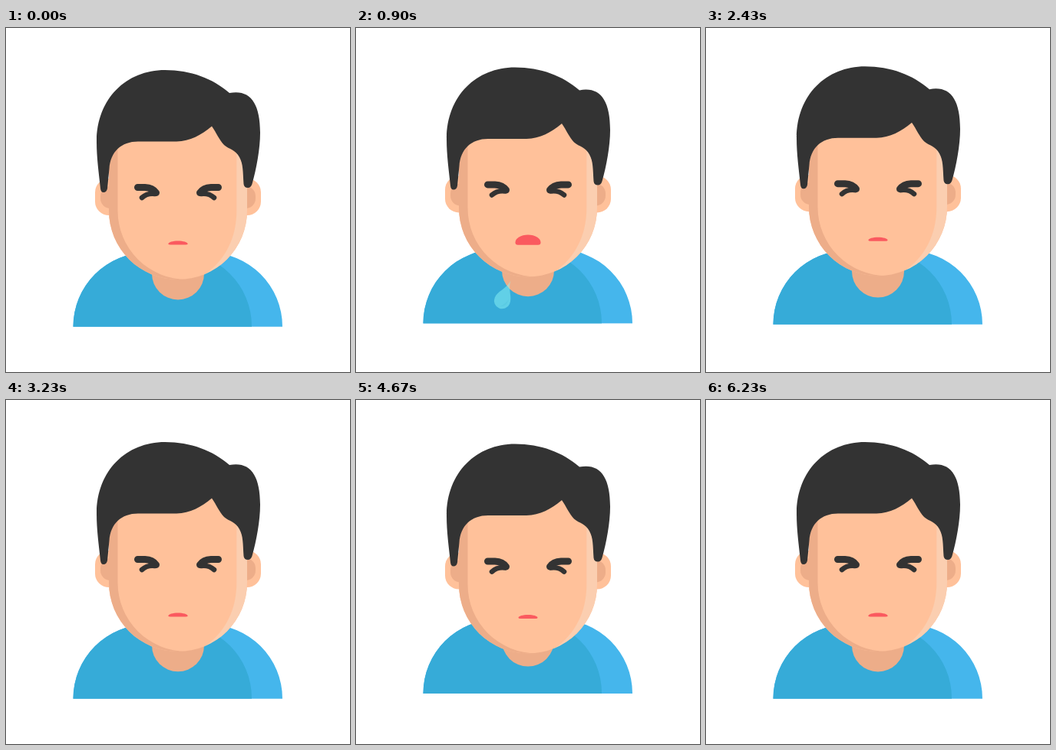
Recreate the animation shown at these times as an HTML page. Size 448 by 450 pixels, loop 6.26 s.

```html
<!DOCTYPE html>
<html lang="en">
<head>
<meta charset="utf-8">
<title>Coughing man</title>
<style>
  html, body { margin: 0; width: 100%; height: 100%; overflow: hidden; background: #fff; }
  svg { display: block; width: 448px; height: 450px; }
  .skin { fill: #ffc19a; }
  .shade { fill: #edad89; }
  .light { fill: #fbceb0; }
  .eye path { fill: none; stroke: #333; stroke-linecap: round; stroke-linejoin: round; }
  .streak { stroke: #f7f2f2; stroke-width: 8; stroke-linecap: round; }
</style>
</head>
<body>
<svg viewBox="0 0 448 450">
  <defs>
    <clipPath id="faceClip"><path d="M134 120H314V239A90 90 0 0 1 134 239Z"/></clipPath>
    <clipPath id="bodyClip"><path d="M87.500 390.700A97 97 0 0 1 184.500 293.700H263A97 97 0 0 1 360 390.700Z"/></clipPath>
    <clipPath id="mouthClip"><path class="mouth"/></clipPath>
    <g id="ear">
      <rect class="skin" x="116" y="197" width="36" height="48" rx="18"/>
      <rect class="shade" x="123" y="207" width="28" height="29" rx="13"/>
    </g>
    <g id="eye" class="eye">
      <path stroke-width="9" d="M171.500 208.500H181Q191 209 195.500 215.500"/>
      <path stroke-width="6.500" d="M194 217Q184 215.500 177 222"/>
    </g>
    <g id="drop">
      <path fill="#93faf9" d="M0-28C1-16 10.500-10 10.500 0A10.500 10.500 0 0 1-10.500 0C-10.500-10-1-16 0-28Z"/>
      <path fill="#84eff1" d="M7-5Q9 5 0 8Q5 3 7-5Z"/>
    </g>
  </defs>

  <g id="body">
    <g clip-path="url(#bodyClip)">
      <rect x="87" y="293" width="274" height="99" fill="#45b6ec"/>
      <path fill="#36abd8" d="M87 392V293H223A97 97 0 0 1 320 390V392Z"/>
    </g>
    <path class="shade" d="M190 290H258V321.400A34 34 0 0 1 190 321.400Z"/>
  </g>

  <g id="head">
    <use href="#ear"/>
    <use href="#ear" transform="matrix(-1 0 0 1 448 0)"/>
    <g clip-path="url(#faceClip)">
      <rect class="skin" x="134" y="120" width="180" height="210"/>
      <path class="shade" d="M134 120H145.500V239A90 90 0 0 0 235.500 329V331H134Z"/>
      <path class="light" d="M314 120H300.300V239C300.300 274 286 304 258 323V331H314Z"/>
    </g>
    <path fill="#333" d="M127 215Q123.500 215 123 210C121 190 118 170 118 149C118 92 157 55 207 55
      C241 55 269 66 291 85C318 80 331 98 331 137C331 158 326 185 320.500 204Q319 209 315 209Q310 209 309.500 204
      C308.500 188 309 178 304 169C299 159 291 159 284 153C278 147 274 137 268 128.500
      C254 140 240 148 222 148.500H172C150 148.500 136 162 134.500 184L132 210Q131 215 127 215Z"/>
    <use href="#eye"/>
    <use href="#eye" transform="matrix(-1 0 0 1 448 0)"/>
    <path class="mouth" fill="#fa5a5f"/>
    <g clip-path="url(#mouthClip)"><ellipse id="teeth" cx="224" fill="#fff"/></g>
  </g>

  <g id="spray"></g>
</svg>

<script>
const LOOP = 3130, TICKS = 94, COUGH_GAP = 33;
const $ = id => document.getElementById(id);
const clamp = x => Math.min(1, Math.max(0, x));
const ramp = (x, a, b) => clamp((x - a) / (b - a));
const smooth = u => u * u * (3 - 2 * u);

// [tick, vertical offset]
const nod = [[0, 0], [8, 0], [18, 3], [21, 3], [31, -7], [38, -7], [46, 2.5],
             [50, 3], [55, 3], [64, -6], [68, -6], [86, 0], [94, 0]];

// Place at the height of the cough (tick 22), speed per tick, tilt, tick when gone
const drops = [
  { x: 177, y: 327, vx: -5, vy: 3.6, tilt: 47, end: 25 },
  { x: 200.5, y: 332, vx: -2, vy: 4.9, tilt: 23, end: 28 },
  { x: 224, y: 338.5, vx: 0, vy: 5, tilt: -3, end: 25.5 },
  { x: 247.5, y: 336, vx: 2.3, vy: 6.2, tilt: -21, end: 27 },
  { x: 276, y: 327.5, vx: 5, vy: 3.6, tilt: -45, end: 25 }
];
const streaks = [[209.5, 298, 206, 312], [224, 295, 224, 310], [238, 298, 241.5, 312]];

function add(tag, attrs) {
  const el = document.createElementNS("http://www.w3.org/2000/svg", tag);
  for (const k in attrs) el.setAttribute(k, attrs[k]);
  return $("spray").appendChild(el);
}
const dropEls = drops.map(() => add("use", { href: "#drop" }));
const streakEls = streaks.map(([x1, y1]) => add("line", { class: "streak", x1, y1 }));
const mouths = document.querySelectorAll(".mouth");

function track(keys, x) {
  const i = Math.max(1, keys.findIndex(k => k[0] >= x));
  const [a, from] = keys[i - 1], [b, to] = keys[i];
  return from + (to - from) * smooth(ramp(x, a, b));
}

// A half ellipse on a flat base with rounded corners
function drawMouth(open) {
  const h = 5 + 34 * open, w = 12.5 + 16.5 * open;
  const top = 281 - 1.5 * open - h / 2, bottom = top + h;
  const side = top + h * .75, bend = top + h * .34;
  const X = k => 224 + k * w;
  const d = `M${X(-1)} ${side}C${X(-1)} ${bend} ${X(-.55)} ${top} 224 ${top}` +
    `C${X(.55)} ${top} ${X(1)} ${bend} ${X(1)} ${side}` +
    `Q${X(1)} ${bottom} ${X(.8)} ${bottom}H${X(-.8)}Q${X(-1)} ${bottom} ${X(-1)} ${side}Z`;
  mouths.forEach(m => m.setAttribute("d", d));
  const t = ramp(open, .4, 1);
  $("teeth").setAttribute("cy", top);
  $("teeth").setAttribute("rx", 50 * t);
  $("teeth").setAttribute("ry", 13.5 * t);
}

function drawSpray(c) {
  const grow = smooth(ramp(c, 16, 19.5));
  drops.forEach((p, i) => {
    const dt = c - 22;
    dropEls[i].setAttribute("transform",
      `translate(${p.x + p.vx * dt} ${p.y + p.vy * dt}) rotate(${p.tilt}) scale(${grow})`);
    dropEls[i].setAttribute("opacity", grow ? clamp((p.end - c) / 2) : 0);
  });
  streaks.forEach(([x1, y1, x2, y2], i) => {
    streakEls[i].setAttribute("x2", x1 + (x2 - x1) * grow);
    streakEls[i].setAttribute("y2", y1 + (y2 - y1) * grow);
    streakEls[i].setAttribute("opacity", grow ? 1 - ramp(c, 22.5, 25) : 0);
  });
}

function draw(ms) {
  const tick = (ms % LOOP) / LOOP * TICKS;
  const cough = tick < 40 ? tick : tick - COUGH_GAP;
  const bob = -3.4 * (1 - Math.cos(2 * Math.PI * tick / TICKS));
  $("body").setAttribute("transform", `translate(0 ${bob})`);
  $("head").setAttribute("transform", `translate(0 ${track(nod, tick)})`);
  drawMouth(smooth(ramp(cough, 14, 19)) * (1 - ramp(cough, 22, 32)) ** 2);
  drawSpray(cough);
}

const start = performance.now();
function loop(now) {
  draw(Math.max(0, now - start));
  requestAnimationFrame(loop);
}
draw(0);
requestAnimationFrame(loop);
</script>
</body>
</html>
```
